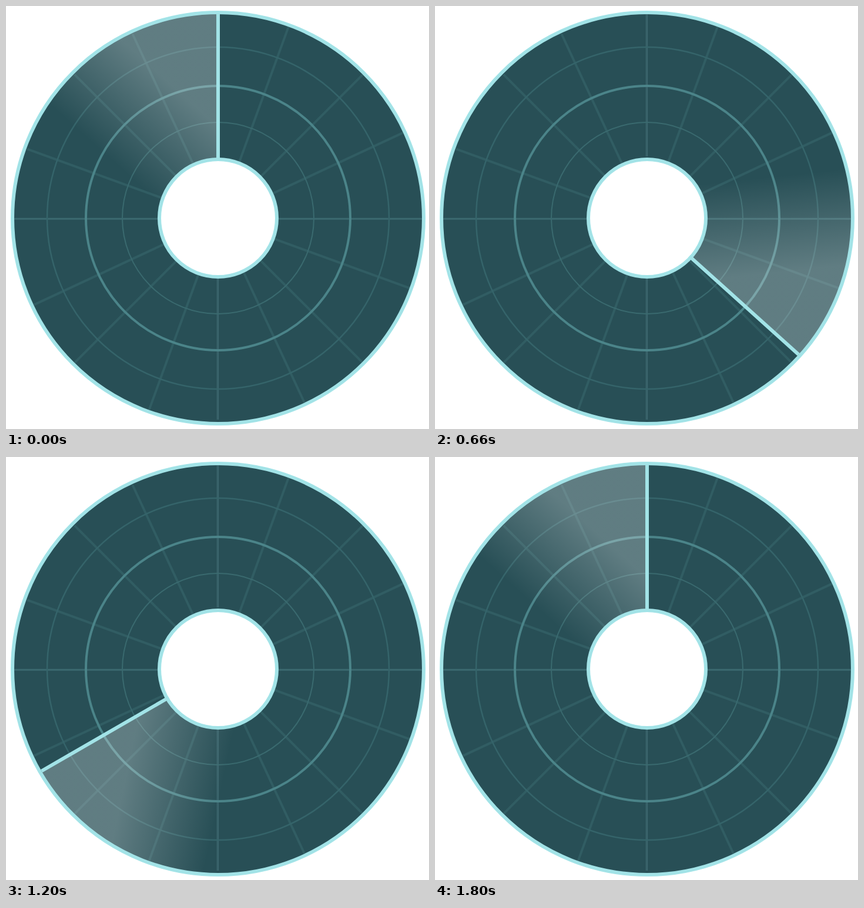
Recreate the animation shown at these times as an HTML page. Size 720 px wide and 720 px high, loop 1.86 s.

```html
<!DOCTYPE html>
<html>
<head>
<meta charset="utf-8">
<style>
html, body { margin: 0; width: 100%; height: 100%; overflow: hidden; background: #fff; }
svg { display: block; width: 100vw; height: 100vh; }
</style>
</head>
<body>
<svg viewBox="0 0 720 720" fill="none">
  <defs>
    <linearGradient id="fade" gradientUnits="userSpaceOnUse" x1="-32" y1="36" x2="77" y2="-85">
      <stop offset="0" stop-color="#fff" stop-opacity="0"/>
      <stop offset="1" stop-color="#fff" stop-opacity=".26"/>
    </linearGradient>
  </defs>
  <circle cx="361" cy="361" r="350" fill="#284f56"/>
  <g id="spokes" transform="translate(362 362)" stroke="#315d63" stroke-width="4"/>
  <path d="M14 362.3H708" stroke="#3b696f" stroke-width="3"/>
  <path d="M359.5 14V256M361.5 14V256M359.5 464V704M361.5 464V704" stroke="#46727a"/>
  <g transform="translate(361 361)">
    <circle r="163" stroke="#3a6a6f" stroke-width="2"/>
    <circle r="225" stroke="#4b8489" stroke-width="4"/>
    <circle r="291" stroke="#35646a" stroke-width="2.5"/>
    <g class="turn"><path d="M0 0V-348A348 348 0 0 0 -348 0Z" fill="url(#fade)"/></g>
    <g stroke="#a2e3e7" stroke-width="6">
      <circle r="350"/>
      <circle r="100" fill="#fff"/>
      <path class="turn" d="M0 -97V-347"/>
    </g>
  </g>
</svg>
<script>
const STEP = 60, LOOP = 1860;
const spokes = document.getElementById('spokes');
const turning = document.querySelectorAll('.turn');

for (const deg of [20, 45, 65, 110, 135, 155]) {
  const line = document.createElementNS('http://www.w3.org/2000/svg', 'path');
  line.setAttribute('d', 'M0 -347V347');
  line.setAttribute('transform', `rotate(${deg})`);
  spokes.append(line);
}

// The beam advances 12 degrees per step and rests upright for two steps.
function draw() {
  const angle = Math.floor(performance.now() % LOOP / STEP) * 12;
  for (const part of turning) part.setAttribute('transform', `rotate(${angle})`);
  requestAnimationFrame(draw);
}
draw();
</script>
</body>
</html>
```
